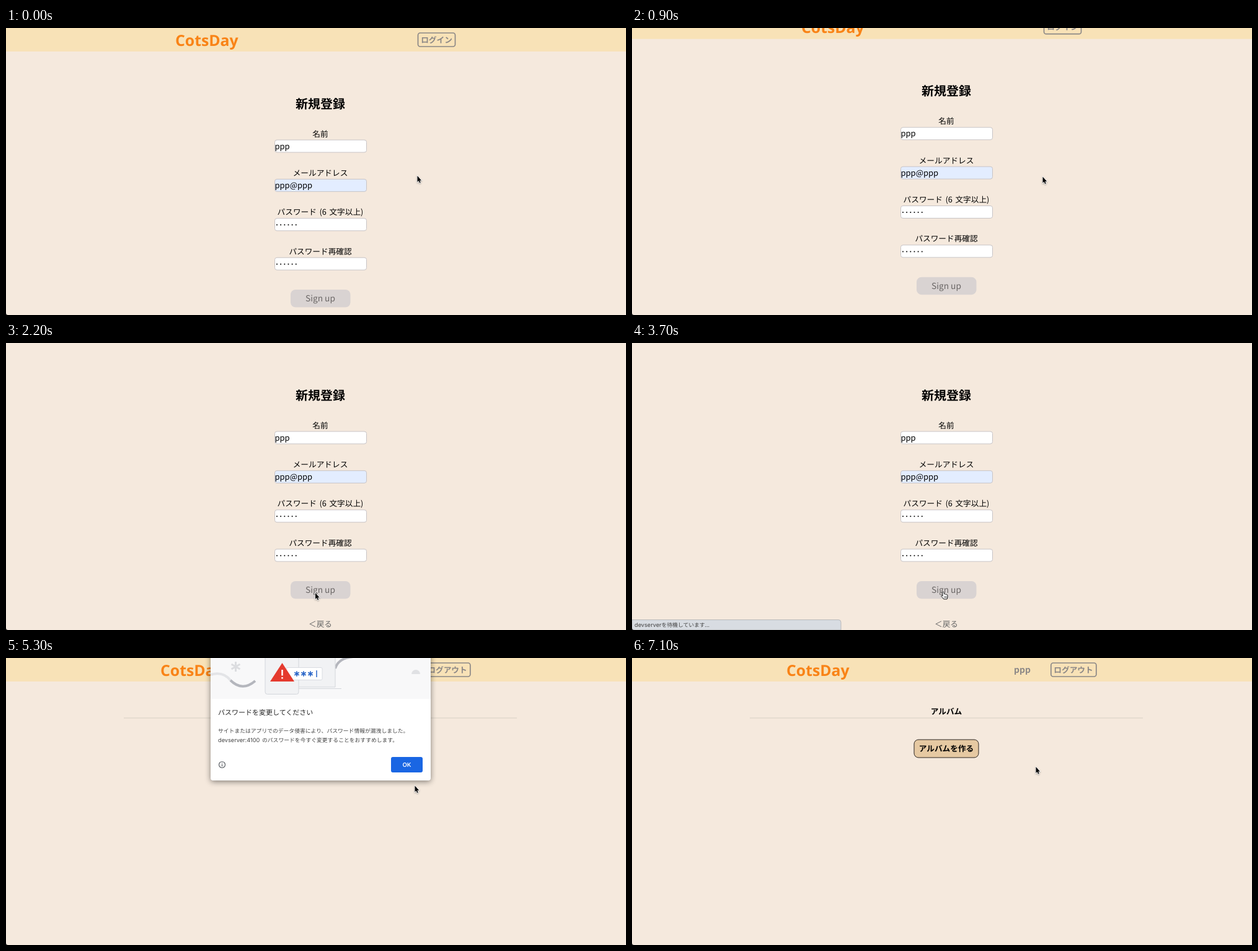
These frames come from a looping animation (1000x464 px, 7200 ms). An HTML page:

```html
<!DOCTYPE html>
<html lang="ja">
<head>
<meta charset="utf-8">
<title>Sign up</title>
<style>
html, body { margin: 0; width: 100%; height: 100%; overflow: hidden; background: #f5e9dd; }
svg { display: block; width: 100%; height: 100%; }
text { font-family: "Noto Sans CJK JP", "Noto Sans CJK", sans-serif; font-size: 12.67px; text-rendering: geometricPrecision; word-spacing: 1.8px; }
.mid { text-anchor: middle; }
.bold { font-weight: 700; }
.logo { font: 700 24.8px "Noto Sans", sans-serif; fill: #f98316; }
.nav { font-weight: 700; fill: #8b8786; }
.frame { fill: none; stroke: #8b8786; stroke-width: 1.7; }
.entry { font-size: 13px; }
.small text { font-size: 8.8px; fill: #444; }
.small .latin { font-family: Inter, sans-serif; font-size: 9.2px; }
</style>
</head>
<body>
<svg viewBox="0 0 1000 464">
  <rect width="1000" height="464" fill="#f5e9dd"/>

  <g id="signup">
    <rect width="1000" height="38" fill="#f8e2b7"/>
    <text class="logo" x="273" y="28.5">CotsDay</text>
    <rect class="frame" x="664.5" y="8" width="60" height="22" rx="3.5"/>
    <text class="nav mid" x="694.5" y="23.5">ログイン</text>
    <text class="mid bold" x="507" y="129.5" style="font-size:20px">新規登録</text>
    <g id="fields"></g>
    <rect x="459" y="423" width="96.5" height="28.5" rx="8" fill="#d9d3d2"/>
    <text class="mid" x="507" y="442" fill="#6b6766" style="font-size:13.7px;word-spacing:0">Sign up</text>
    <text class="mid" x="507" y="497" fill="#666">＜戻る</text>
  </g>

  <g id="status" class="small">
    <path d="M0 447.5H333Q337 447.5 337 451.5V464H0Z" fill="#d8dce2" stroke="#b9b9ba"/>
    <text class="latin" x="4" y="459">devserver</text>
    <text x="47.5" y="459">を待機しています...</text>
  </g>

  <g id="album">
    <rect width="1000" height="38" fill="#f8e2b7"/>
    <text class="logo" x="249" y="28.5">CotsDay</text>
    <text class="nav mid" x="629.5" y="23.5" style="font-size:13.9px">ppp</text>
    <rect class="frame" x="675.8" y="8" width="73" height="22" rx="3.5"/>
    <text class="nav mid" x="712" y="23.5">ログアウト</text>
    <text class="mid bold" x="507" y="91">アルバム</text>
    <path d="M190 97H824" stroke="#e2d8cd" stroke-width="1.5"/>
    <rect x="455" y="132" width="104" height="29" rx="7" fill="#e6c9a2" stroke="#2b2520"/>
    <text class="mid bold" x="507" y="151">アルバムを作る</text>
  </g>

  <g id="dialog">
    <path d="M330-20H685V194Q685 198 681 198H334Q330 198 330 194Z" fill="#fff" style="filter:drop-shadow(0 2px 5px #0007)"/>
    <path d="M330-20H685V66H330Z" fill="#f8f8f9"/>
    <g fill="none" stroke-width="4">
      <path d="M330 27Q350 21 362 36" stroke="#e3e4e7"/>
      <path d="M362 36Q381 55 402 37" stroke="#b4b6bd"/>
      <path d="M531 17Q536 0 560-2" stroke="#b4b6bd"/>
    </g>
    <path d="M472-5H531V47H472M472 49.5H541" fill="#f1f2f4" stroke="#d3d6db"/>
    <rect x="418" y="-10" width="54" height="68.5" rx="3.5" fill="#f1f2f4" stroke="#d3d6db"/>
    <rect x="452" y="15.5" width="58" height="20" rx="2" fill="#fff" stroke="#d9dce1"/>
    <g id="stars" fill="none"></g>
    <path d="M501 20V31" stroke="#2a66c8" stroke-width="1.5"/>
    <path d="M445.5 8L465 38H426Z" fill="#e53a2e"/>
    <path d="M445.5 19V28.5M445.5 31V33.5" stroke="#fff" stroke-width="2.5"/>
    <path d="M654 26A7 7 0 0 1 668 26Z" fill="#e0e1e4"/>
    <text x="342" y="91.5" fill="#222" style="font-size:11px">パスワードを変更してください</text>
    <g class="small">
      <text x="342" y="120.5">サイトまたはアプリでのデータ侵害により、パスワード情報が漏洩しました。</text>
      <text class="latin" x="342" y="136">devserver:4100</text>
      <text x="413" y="136">のパスワードを今すぐ変更することをおすすめします。</text>
    </g>
    <circle cx="348.5" cy="172.5" r="5" fill="none" stroke="#5f6368" stroke-width="1.2"/>
    <path d="M348.5 171.5V175.5M348.5 169V170.3" stroke="#5f6368" stroke-width="1.2"/>
    <rect x="621" y="160" width="51" height="25" rx="3" fill="#1a66e3"/>
    <text class="mid" x="646.5" y="176" fill="#fff" style="font:600 9.5px Inter,sans-serif">OK</text>
  </g>

  <path d="M0 460.5Q0 464 3.5 464H0Z" fill="#111"/>
  <g id="arrow">
    <path d="M0 0V10L2.1 8L3.7 11.6L5.2 11L3.7 7.4H6.6Z" stroke="#fff" stroke-width="1.4" paint-order="stroke" style="filter:drop-shadow(0 1px 1px #0005)"/>
  </g>
  <g id="hand">
    <path d="M-1.2.6Q0-.8 1.2.6L2 4Q3 3 4 4.3Q5 3.6 5.8 5Q7.5 4.5 7.5 6.5Q7.7 9 6.6 12H1.2Q-.5 9.500-2.8 7.4Q-2.5 5.600-.3 7Z" fill="#fff" stroke="#111" stroke-linejoin="round"/>
    <path d="M2.3 7.5V10M4 7.5V10M5.6 7.5V10" stroke="#111" stroke-width=".7"/>
  </g>
</svg>
<script>
const LOOP = 7200, SCROLL = 38;
const $ = id => document.getElementById(id);
const show = (id, on) => $(id).style.display = on ? "" : "none";
const move = (id, x, y) => $(id).setAttribute("transform", `translate(${x} ${y})`);

const fields = [["名前", "ppp"], ["メールアドレス", "ppp@ppp"], ["パスワード (6 文字以上)"], ["パスワード再確認"]];
$("fields").innerHTML = fields.map(([label, value], i) => {
  const y = i * 63.4;
  const dots = Array.from({ length: 6 }, (_, k) => `<circle cx="${437 + k * 6.15}" cy="${y + 191.5}" r="1"/>`).join("");
  return `<text class="mid" x="507" y="${y + 175.5}">${label}</text>
    <rect x="433.5" y="${y + 181}" width="148" height="20" rx="3.5" fill="${i == 1 ? "#e3edff" : "#fff"}" stroke="#c8c4c6"/>
    ${value ? `<text class="entry" x="433.5" y="${y + 195.5}">${value}</text>` : dots}`;
}).join("");

function star(x, y, r, color, width) {
  const arms = [30, 90, 150].map(deg => {
    const a = deg * Math.PI / 180, dx = r * Math.cos(a), dy = r * Math.sin(a);
    return `M${x - dx} ${y - dy}L${x + dx} ${y + dy}`;
  });
  return `<path d="${arms.join("")}" stroke="${color}" stroke-width="${width}"/>`;
}
$("stars").innerHTML = star(370.5, 14, 8, "#dcdde0", 3) +
  [469, 480, 491].map(x => star(x, 25.5, 4.3, "#2a66c8", 1.7)).join("");

// Each stop: time, then values; eased between neighbours.
function track(stops, t) {
  let i = stops.findIndex(s => s[0] > t);
  if (i < 0) i = stops.length;
  const a = stops[Math.max(i - 1, 0)], b = stops[Math.min(i, stops.length - 1)];
  const p = b[0] > a[0] ? (t - a[0]) / (b[0] - a[0]) : 0;
  const e = p * p * (3 - 2 * p);
  return a.slice(1).map((v, k) => v + (b[k + 1] - v) * e);
}
const scrollStops = [[650, 0], [1130, SCROLL]];
const pointerStops = [
  [0, 663.5, 239], [900, 662.5, 240.5], [1150, 662, 241], [1650, 506, 396], [2000, 499, 404],
  [2400, 499, 404], [2700, 501.5, 402], [3700, 501.5, 402], [4000, 504.5, 400],
  [4700, 504.5, 400], [5250, 659.5, 206.5], [5350, 659.5, 206.5], [5650, 651.5, 176]
];

function draw(now) {
  const t = now % LOOP;
  const signedIn = t >= 4000, overButton = t >= 2500 && !signedIn;
  show("signup", !signedIn);
  show("status", t >= 3700 && !signedIn);
  show("album", signedIn);
  show("dialog", t >= 4800 && t < 5800);
  show("hand", overButton);
  show("arrow", !overButton);
  move("signup", 0, -track(scrollStops, t)[0]);
  const [x, y] = track(pointerStops, t);
  move("arrow", x, y);
  move("hand", x, y);
}
const start = performance.now();
(function tick() {
  draw(performance.now() - start);
  requestAnimationFrame(tick);
})();
</script>
</body>
</html>
```
